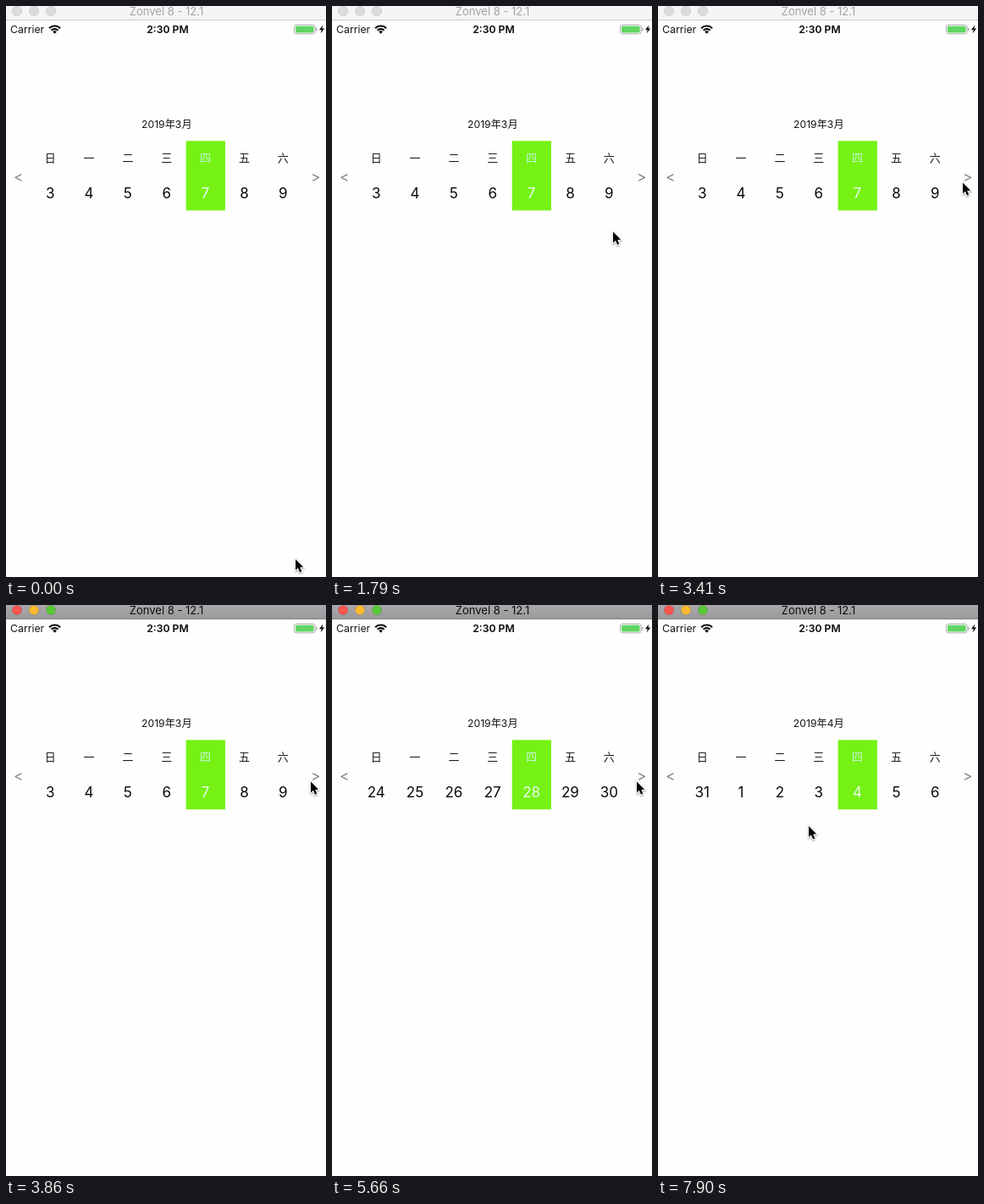
Recreate the animation shown at these times as an HTML page with a canvas. Size 378x674 px, loop 8 s.

```html
<!DOCTYPE html>
<html lang="zh">
<head>
<meta charset="utf-8">
<title>Week calendar</title>
<style>
  html, body { margin: 0; width: 100%; height: 100%; overflow: hidden; background: #fefefe; }
  canvas { display: block; width: 378px; height: 674px; }
</style>
</head>
<body>
<canvas id="stage"></canvas>
<script>
const W = 378, H = 674, LOOP = 8000;
const FONT = 'Inter, "Noto Sans CJK SC", "Noto Sans CJK JP", sans-serif';
const COLUMN = 45.85, FIRST_X = 52.2;
const ACTIVATE = 3860;
const WEEK_CHANGES = [4010, 4760, 5660, 7160];
const WEEKDAYS = [...'日一二三四五六'];

// The pointer moves in discrete steps along one curve per stroke.
const STEP = 145;
const POINTER_HOME = [342, 653];
const STROKES = [
  { start: 300, steps: 6, bend: [369, 490], end: [328, 316.4] },
  { start: 1340, steps: 4, bend: [314, 292], end: [332, 266.4] },
  { start: 2240, steps: 5, bend: [298, 242], end: [324, 230] },
  { start: 2965, steps: 4, bend: [357, 213], end: [360, 208.4] },
  { start: 7460, steps: 2, bend: [300, 230], end: [199, 258.5] },
  { start: 7900, steps: 1, bend: [188, 260], end: [178, 261] }
];

const canvas = document.getElementById('stage');
const ctx = canvas.getContext('2d');
const ratio = window.devicePixelRatio || 1;
canvas.width = Math.round(W * ratio);
canvas.height = Math.round(H * ratio);

function text(str, x, y, size, color, weight = 400, align = 'center') {
  ctx.font = `${weight} ${size}px ${FONT}`;
  ctx.textAlign = align;
  ctx.fillStyle = color;
  ctx.fillText(str, x, y);
}

function polygon(points) {
  ctx.beginPath();
  points.forEach(([x, y]) => ctx.lineTo(x, y));
  ctx.closePath();
}

function roundRect(x, y, w, h, r) {
  ctx.beginPath();
  ctx.roundRect(x, y, w, h, r);
}

function curve(from, bend, to, u) {
  const v = 1 - u;
  return from.map((a, i) => v * v * a + 2 * u * v * bend[i] + u * u * to[i]);
}

function pointerAt(t) {
  let place = POINTER_HOME;
  for (const { start, steps, bend, end } of STROKES) {
    if (t < start) break;
    const done = Math.min(steps, 1 + Math.floor((t - start) / STEP));
    place = curve(place, bend, end, done / steps);
  }
  return place;
}

function drawTitleBar(active) {
  const fill = ctx.createLinearGradient(0, 0, 0, 16);
  fill.addColorStop(0, active ? '#aaa7aa' : '#f6f6f6');
  fill.addColorStop(1, active ? '#9d9a9d' : '#f4f4f4');
  ctx.fillStyle = fill;
  ctx.fillRect(0, 0, W, 16);
  ctx.fillStyle = active ? '#858285' : '#cdcdcd';
  ctx.fillRect(0, 16, W, 1);

  const lights = active ? ['#f9564f', '#fdbb2f', '#58c838'] : Array(3).fill('#dcdcdc');
  lights.forEach((color, i) => {
    ctx.beginPath();
    ctx.arc(13 + i * 20, 6, 5.6, 0, Math.PI * 2);
    ctx.fillStyle = color;
    ctx.fill();
    ctx.strokeStyle = active ? 'rgba(0,0,0,0.16)' : '#cbcbcb';
    ctx.lineWidth = 0.8;
    ctx.stroke();
  });
  text('Zonvel 8 - 12.1', 189.5, 11, 13, active ? '#0c0c0c' : '#a3a3a3');
}

function drawWifi(x, y) {
  const from = -Math.PI * 0.75, to = -Math.PI * 0.25;
  ctx.strokeStyle = ctx.fillStyle = '#050505';
  ctx.lineWidth = 2.1;
  for (const r of [5.6, 9.2]) {
    ctx.beginPath();
    ctx.arc(x, y, r, from, to);
    ctx.stroke();
  }
  ctx.beginPath();
  ctx.moveTo(x, y);
  ctx.arc(x, y, 3.3, from, to);
  ctx.fill();
}

function drawBattery() {
  roundRect(340.5, 22.3, 24.6, 10.6, 2.6);
  ctx.strokeStyle = '#a4a4a4';
  ctx.lineWidth = 0.9;
  ctx.stroke();
  roundRect(342, 23.8, 21.6, 7.6, 1.3);
  ctx.fillStyle = '#60d662';
  ctx.fill();
  roundRect(366, 25.8, 1.4, 3.6, [0, 1, 1, 0]);
  ctx.fillStyle = '#a4a4a4';
  ctx.fill();
  polygon([[374.4, 22.6], [370, 28.2], [372.8, 28.2], [371.6, 32.4], [376.2, 26.6], [373.4, 26.6]]);
  ctx.fillStyle = '#050505';
  ctx.fill();
}

function drawStatusBar() {
  text('Carrier', 5, 32, 12.3, '#161616', 400, 'left');
  drawWifi(57.6, 32.7);
  text('2:30 PM', 191, 32, 12.2, '#080808', 600);
  drawBattery();
}

function drawCalendar(week) {
  const month = week === 4 ? 4 : 3;
  text(`2019年${month}月`, 189.8, 144, 12.2, '#161616');
  ctx.fillStyle = '#75f214';
  ctx.fillRect(212.7, 159.3, 46.2, 82);

  WEEKDAYS.forEach((name, i) => {
    const x = FIRST_X + i * COLUMN;
    const date = new Date(2019, 2, 3 + week * 7 + i).getDate();
    const selected = i === 4;
    text(name, x, 184.3, 13, selected ? '#c8f3dc' : '#1c1c1c');
    text(date, x, 227, 17, selected ? '#f0f8f4' : '#080808');
  });
  text('<', 14.5, 208, 17, '#828282');
  text('>', 365.8, 208, 17, '#828282');
}

function drawPointer([x, y]) {
  ctx.save();
  ctx.translate(x, y);
  polygon([[0, 0], [0, 13], [2.9, 10.3], [5.1, 15.4], [7.3, 14.4], [5.2, 9.5], [9.2, 9.3]]);
  ctx.shadowColor = 'rgba(0,0,0,0.4)';
  ctx.shadowBlur = 2 * ratio;
  ctx.shadowOffsetY = ratio;
  ctx.strokeStyle = '#fff';
  ctx.lineWidth = 2;
  ctx.stroke();
  ctx.shadowColor = 'transparent';
  ctx.fillStyle = '#000';
  ctx.fill();
  ctx.restore();
}

function draw(t) {
  ctx.setTransform(ratio, 0, 0, ratio, 0, 0);
  ctx.fillStyle = '#fefefe';
  ctx.fillRect(0, 0, W, H);
  drawTitleBar(t >= ACTIVATE);
  drawStatusBar();
  drawCalendar(WEEK_CHANGES.filter(start => t >= start).length);
  drawPointer(pointerAt(t));
}

const began = performance.now();
function tick() {
  draw((performance.now() - began) % LOOP);
  requestAnimationFrame(tick);
}
tick();
</script>
</body>
</html>
```
